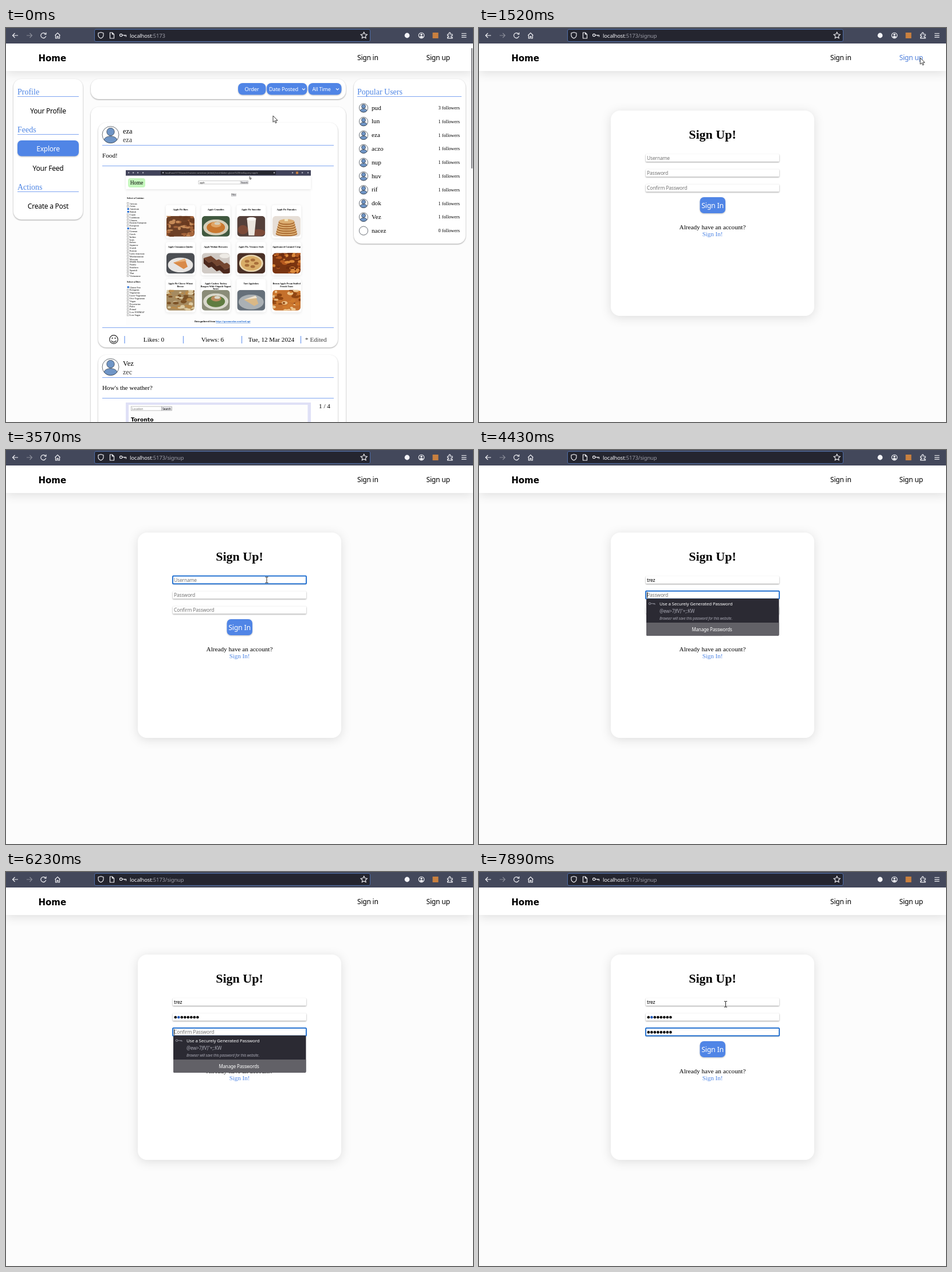
Recreate the animation shown at these times as an HTML page. Size 815 px wide and 687 px high, loop 8000 ms.

```html
<!DOCTYPE html>
<html lang="en">
<head>
<meta charset="utf-8">
<title>Sign up flow</title>
<style>
html, body { margin: 0; width: 100%; height: 100%; overflow: hidden; }
svg { display: block; width: 100vw; height: 100vh; }
svg svg { width: 49px; height: 36px; }
text { font-family: "Liberation Serif", serif; white-space: pre; }
.sans { font-family: "Noto Sans", "Open Sans", sans-serif; letter-spacing: -.02em; }
.wide { font-family: "DejaVu Sans", sans-serif; font-weight: bold; }
.mid { text-anchor: middle; }
.end { text-anchor: end; }
.bold { font-weight: bold; }
.italic { font-style: italic; }
.blue { fill: #4e85e4; }
.white { fill: white; }
.grey { fill: #757575; }
.dark { fill: #3a3a3a; }
.pale { fill: #a9a9b4; }
.panel { fill: white; filter: drop-shadow(0 1px 1.3px rgba(0,0,0,.36)); }
.lift { fill: white; filter: drop-shadow(0 3px 9px rgba(0,0,0,.12)); }
.card { fill: white; filter: drop-shadow(0 1px 2px rgba(0,0,0,.1)); }
.button { fill: #5085e6; filter: drop-shadow(0 1px 1px rgba(0,0,0,.25)); }
.field { fill: white; filter: drop-shadow(0 1px 1px rgba(0,0,0,.4)); }
.icon { fill: none; stroke: #f4f4f8; stroke-width: 1.15; }
.glow { fill: #f6ee3e; mix-blend-mode: multiply; }
</style>
</head>
<body>
<svg id="stage" viewBox="0 0 815 687" preserveAspectRatio="none"></svg>
<script>
const BLUE = '#7fa5f1';
const list = (items, draw) => items.map(draw).join('');
const text = (x, y, size, str, cls = '') =>
  `<text x="${x}" y="${y}" font-size="${size}" class="${cls}">${str}</text>`;
const rect = (x, y, w, h, attrs = '') =>
  `<rect x="${x}" y="${y}" width="${w}" height="${h}" ${attrs}/>`;
const rule = (x1, x2, y) => rect(x1, Math.floor(y), x2 - x1, 1, `fill="${BLUE}"`);
const panel = (x, y, w, h) => rect(x, y, w, h, 'rx="14" class="panel"');
const button = (x, y, w, h, rx = 7) => rect(x, y, w, h, `rx="${rx}" class="button"`);
const path = (d, attrs = 'class="icon"') => `<path d="${d}" ${attrs}/>`;
const circle = (x, y, r, attrs) => `<circle cx="${x}" cy="${y}" r="${r}" ${attrs}/>`;
const ellipse = (x, y, rx, ry, fill) => `<ellipse cx="${x}" cy="${y}" rx="${rx}" ry="${ry}" fill="${fill}"/>`;

// Small seeded generator for the crumbs inside the food pictures
let seed = 7;
const random = () => (seed = seed * 16807 % 2147483647) / 2147483647;

function avatar(x, y, r, blank) {
  const s = r / 14.5, line = `stroke="#29313c" stroke-width="${.7 / s}"`;
  const person = blank ? '' : circle(0, -5, 6.7, `fill="#6f95c6" ${line}`) +
    path('M-11.5 9C-9 .5 9 .5 11.5 9A14.5 14.5 0 0 1-11.5 9Z', `fill="#6f95c6" ${line}`);
  return `<g transform="translate(${x} ${y}) scale(${s})">` +
    circle(0, 0, 14.5, `fill="white" ${line}`) + person + '</g>';
}

function browserBar() {
  return rect(0, 0, 815, 27, 'fill="#43485b"') +
    rect(154.5, 2.5, 481, 21, 'rx="2.5" fill="#24252f" stroke="#4f6ea8"') +
    path('M21 13h-9.5m4-4l-4 4 4 4') +
    path('M36 13h9.5m-4-4l4 4-4 4', 'class="icon" opacity=".4"') +
    path('M69 10.5a4.5 4.5 0 1 0 .7 3.5M70 7.8v3.2h-3.2') +
    path('M85.5 13l4.5-4.5 4.5 4.5M86.5 12v6h2.5v-3.5h2v3.5h2.5v-6') +
    path('M165.5 7.5l4.5 1.5v3.5c0 3-2 4.5-4.5 5.5-2.5-1-4.5-2.5-4.5-5.5V9z') +
    path('M181.5 8h4l3 3v7h-7zm4 0v3h3') +
    circle(200.7, 12.5, 2.2, 'class="icon"') + path('M203 12.5h6.5v3m-2.5-3v2') +
    path('M624.7 7.3l1.7 3.5 3.8.5-2.8 2.7.7 3.8-3.4-1.8-3.4 1.8.7-3.8-2.8-2.7 3.8-.5z') +
    circle(700, 13, 4.4, 'fill="#f4f4f8"') +
    circle(725, 13, 4.8, 'class="icon"') + circle(725, 11.6, 1.8, 'fill="#f4f4f8"') +
    path('M721.5 15.8c1-2.5 6-2.5 7 0l-3.5 1.5z', 'fill="#f4f4f8"') +
    rect(744.5, 8, 10, 10, 'fill="#c9803f"') +
    path('M770.5 11h2.5V9.3a1.4 1.4 0 0 1 2.8 0V11h3.2v2.5h-1.2a1.3 1.3 0 0 0 0 2.6h1.2v1.8h-8.5v-2h1.2a1.2 1.2 0 0 0 0-2.4h-1.2z') +
    path('M795 9.5h8.5m-8.5 3.3h8.5m-8.5 3.3h8.5') +
    `<text x="216" y="16.5" font-size="9.5" class="sans" fill="#f4f4f8">localhost<tspan fill="#9a9ba6">:5173<tspan id="route"></tspan></tspan></text>`;
}

function header() {
  return rect(0, 27, 815, 48, 'class="lift"') + text(56.5, 57.5, 15, 'Home', 'wide') +
    text(613, 56, 12.1, 'Sign in', 'sans') +
    '<text id="signup-link" x="733.5" y="56" font-size="12.2" class="sans">Sign up</text>';
}

function sidebar() {
  const title = (y, str) => text(20, y, 14, str, 'blue') + rule(20, 127, y + 3.5);
  const item = (y, str, cls = '') => text(73.5, y, 12, str, 'sans mid ' + cls);
  return panel(13, 89, 121, 245) +
    title(116, 'Profile') + item(149, 'Your Profile') +
    title(181.5, 'Feeds') + button(20, 196, 107, 27.5) + item(214.5, 'Explore', 'white') +
    item(249, 'Your Feed') + title(281.5, 'Actions') + item(314.5, 'Create a Post');
}

function popularUsers() {
  const names = ['pud', 'lun', 'eza', 'aczo', 'nup', 'huv', 'rif', 'dok', 'Vez', 'nacez'];
  return panel(607, 89, 195, 287) + text(613, 116, 14, 'Popular Users', 'blue') + rule(613, 795, 119.5) +
    list(names, (name, i) => {
      const y = 139 + i * 23.8;
      return avatar(624, y + .3, 7.6, i === 9) + text(638, y + 3.5, 11.2, name) +
        text(792, y + 3, 8.3, `${[3, 1, 1, 1, 1, 1, 1, 1, 1, 0][i]} followers`, 'end');
    });
}

function sortBar() {
  const chevron = x => path(`M${x} 105.5l2.5 2.5 2.5-2.5`);
  return panel(148, 89, 445, 35) + button(405, 96, 48.5, 20.5, 8) + button(455, 96, 70.5, 20.5, 8) +
    button(527.5, 96, 58, 20.5, 8) + text(429, 110, 9.4, 'Order', 'sans mid white') +
    text(459, 110, 9.3, 'Date Posted', 'sans white') + text(534.5, 110, 9, 'All Time', 'sans white') +
    chevron(517) + chevron(576);
}

// Simple dishes; each takes the main, accent and light tone
const DISHES = {
  heap: (main, accent, light) => list([...Array(45)], (_, i) =>
    ellipse(random() * 49, random() * 36, 2 + random() * 3.5, 1.2 + random() * 2, [main, accent, light][i % 3])),
  plate: (main, accent, light) => ellipse(24.5, 20, 22, 14, light) + ellipse(24.5, 20, 16, 10, main) +
    ellipse(25, 15, 9, 5, accent) + ellipse(27, 13, 5, 2.5, light),
  slice: (main, accent, light) => ellipse(24.5, 21, 22, 13, light) +
    path('M12 17L32 10 37 24 30 28z', `fill="${main}"`) + path('M12 17L32 10 35 14z', `fill="${accent}"`),
  pie: (main, accent, light) => ellipse(24.5, 18, 21, 15, light) + ellipse(24.5, 18, 18, 12.5, main) +
    list([0, 1, 2, 3, 4], i => ellipse(24.5 + 9 * Math.cos(i * 1.26), 18 + 6 * Math.sin(i * 1.26), 4, 2.5, accent)),
  glass: (main, accent, light) => ellipse(10, 24, 9, 8, accent) + ellipse(37, 29, 12, 6, accent) +
    path('M17 4H33L30 34H20z', `fill="${main}"`) + ellipse(25, 5, 8, 3, light),
  stack: (main, accent, light) => list([0, 1, 2, 3, 4, 5], i =>
    ellipse(24.5, 31 - i * 4, 19 - i, 4.5, accent) + ellipse(24.5, 29.5 - i * 4, 18.5 - i, 4, main)) + rect(21, 5, 6, 4, `fill="${light}"`),
  bars: (main, accent, light) => list([0, 1, 2], i =>
    path(`M${3 + i * 14} ${9 + i * 6}l13-4 9 7-13 5z`, `fill="${accent}"`) +
    path(`M${3 + i * 14} ${9 + i * 6}l9 8v9l-9-8zm9 8l13-5v9l-13 5z`, `fill="${main}"`)) + ellipse(40, 5, 9, 4, light)
};

const photo = (x, y, dish, [back, ...tones]) =>
  `<svg x="${x}" y="${y}" width="49" height="36">${rect(0, 0, 49, 36, `rx="6" fill="${back}"`)}` +
  `<g style="clip-path:inset(0 round 6px)">${DISHES[dish](...tones)}</g></svg>`;

function recipePicture() {
  const cuisines = 'African,Asian,American,British,Cajun,Caribbean,Chinese,Eastern European,European,French,German,Greek,Indian,Irish,Italian,Japanese,Jewish,Korean,Latin American,Mediterranean,Mexican,Middle Eastern,Nordic,Southern,Spanish,Thai,Vietnamese'.split(',');
  const diets = 'Gluten Free,Ketogenic,Vegetarian,Lacto-Vegetarian,Ovo-Vegetarian,Vegan,Pescetarian,Paleo,Primal,Low FODMAP,Low Sugar'.split(',');
  const checks = (names, top, on) => list(names, (name, i) => {
    const y = top + i * 4.85;
    return rect(211.7, y - 1.6, 3, 3, on.includes(i) ? 'fill="#1764d0"' : 'fill="white" stroke="#777" stroke-width=".5"') +
      text(216, y + 1.5, 4.1, name);
  });
  const recipes = [
    ['Apple Pie Bars', 'heap', '#6d4026 #a5643a #6a3a20 #c58a58'],
    ['Apple Crumbles', 'plate', '#40583f #c9782f #e0a566 #d5cdb8'],
    ['Apple Pie Smoothie', 'glass', '#54403a #ece6de #7c4a38 #faf8f4'],
    ['Apple Pie Pancakes', 'stack', '#e6ded6 #dcae72 #a8682f #f4e4b8'],
    ['Apple Cinnamon Quiche', 'slice', '#4c4f54 #d98a48 #e8b27c #e6e4e2'],
    ['Apple Walnut Brownies', 'bars', '#d0cac5 #4c281c #744630 #eeebe6'],
    ['Apple Pie, Viennese Style', 'pie', '#4a3026 #d9ad68 #a86e3a #ead9b4'],
    ['Applesauced Caramel Crisp', 'heap', '#7a3410 #b5591f #6e2c0e #dc8a3c'],
    ['Apple Pie Cheese Wheat|Breeze', 'heap', '#a58a60 #b98a4a #7c5226 #dccba4'],
    ['Apple Cashew Turkey|Burgers With Chipotle Yogurt|Sauce', 'plate', '#8a8c78 #5f7c40 #b98a5e #d9d8cc'],
    ['Tart Appleslaw', 'slice', '#66707a #d9b886 #f0e4d0 #aab0b4'],
    ['Brown Apple Pecan Stuffed|French Toast', 'heap', '#c4702c #d07a2c #8f4512 #ecc48c']
  ];
  const cards = list(recipes, ([name, dish, colours], i) => {
    const x = 280 + i % 4 * 61.7, y = 327.8 + Math.floor(i / 4) * 64.5;
    return rect(x - 1, y - 19, 51, 58, 'rx="4" class="card"') + photo(x, y, dish, colours.split(' ')) +
      list(name.split('|'), (line, k) => text(x + 24.5, y - 9.5 + k * 4.4, 4.1, line, 'mid bold'));
  });
  return rect(209, 248, 323, 270, 'fill="#fdfdfd"') + rect(209, 257, 323, 24, 'class="card"') +
    rect(209, 248, 323, 9.5, 'fill="#41435a"') + rect(270, 249, 201, 7, 'rx="1" fill="#25262f"') +
    text(278, 254, 4, 'localhost:5173/search?cuisine=american,british,french&amp;diet=gluten%20free&amp;query=apple', 'sans pale') +
    list([213, 221, 229, 238, 273, 467, 499, 516, 526], x => rect(x, 251.2, 2.2, 2.2, 'fill="#a9aab6"')) +
    rect(506, 250.5, 4, 4, 'fill="#c9803f"') +
    rect(213, 262, 30, 16, 'rx="4" fill="#c6f8be"') + text(228, 273, 9.3, 'Home', 'mid') +
    rect(336, 266.5, 73, 5.5, 'fill="white" stroke="#999" stroke-width=".5"') + text(338, 270.8, 4, 'apple') +
    '<rect id="search" x="410" y="266.5" width="12.5" height="5.5" stroke="#999" stroke-width=".5"/>' +
    text(416.2, 270.8, 3.7, 'Search', 'sans mid') +
    rect(393.5, 288.8, 8, 4.7, 'fill="#e4e4e8" stroke="#999" stroke-width=".4"') + text(397.5, 292.4, 3.4, 'Filter', 'mid') +
    text(211, 297.5, 4.3, 'Select a Cuisine:', 'bold') + checks(cuisines, 306, [2, 3, 9]) +
    text(211, 443.5, 4.3, 'Select a Diet:', 'bold') + checks(diets, 452, [0]) + cards +
    text(329, 513, 4.3, 'Data gathered from <tspan fill="#1764d0" text-decoration="underline">https://spoonacular.com/food-api</tspan>', 'bold') +
    '<g id="tiny-pointer">' + path(ARROW, 'fill="white" stroke="black" stroke-width="1.4" transform="scale(.4)"') + '</g>';
}

const ARROW = 'M0 0v11.2l2.6-2.4 1.8 4 1.8-.8-1.8-3.8h3.6z';

function post(y, user, handle, message, height) {
  return panel(161, y, 418, height) + avatar(182.5, y + 21, 14.5) +
    text(204, y + 18.5, 12.5, user) + text(204, y + 33.5, 12, handle, 'dark') + rule(168, 572, y + 39) +
    text(168, y + 61, 11.2, message) + rule(168, 572, y + 75);
}

function feed() {
  const divider = x => rect(x - .7, 537, 1.4, 13, `fill="${BLUE}"`);
  return panel(148, 137.5, 445, 600) + post(165, 'eza', 'eza', 'Food!', 392) + recipePicture() +
    rule(168, 572, 522) + circle(188, 543, 7.3, 'fill="none" stroke="#222" stroke-width="1.2"') +
    circle(185.5, 540.8, 1, '') + circle(190.5, 540.8, 1, '') +
    path('M183.8 545a4.7 4.7 0 0 0 8.4 0', 'fill="none" stroke="#222" stroke-width="1.2"') +
    list([207, 309.5, 411.5, 514.5], divider) +
    text(258, 547, 11.2, 'Likes: 0', 'mid') + text(360.5, 547, 11.2, 'Views: 6', 'mid') +
    text(463, 547, 11.2, 'Tue, 12 Mar 2024', 'mid') + text(522, 547, 11.2, '* Edited', 'dark') +
    post(570, 'Vez', 'zec', "How's the weather?", 160) +
    rect(209, 653, 323, 40, 'fill="#dfe0f6"') + rect(214, 657, 312.5, 40, 'fill="#fdfdfd"') +
    rect(218.5, 660, 53, 7, 'fill="white" stroke="#999" stroke-width=".6"') + text(220, 665.5, 5, 'Location', 'sans grey') +
    rect(271.5, 660, 18, 7, 'fill="#e4e4e8" stroke="#999" stroke-width=".6"') + text(280.5, 665.5, 4.7, 'Search', 'sans mid') +
    text(218, 686, 9.2, 'Toronto', 'wide') + text(546, 663, 11.2, '1 / 4') +
    rect(812, 35, 2, 210, 'rx=".8" fill="#7d7d82"');
}

function signupPage() {
  return rect(230, 144, 355, 358, 'rx="16" class="lift"') + text(407.5, 193, 22, 'Sign Up!', 'bold mid') +
    button(385.5, 295, 44.5, 28) + text(407.5, 314, 12.4, 'Sign In', 'sans mid white') +
    text(407.5, 350.5, 11.2, 'Already have an account?', 'mid') + text(407.5, 363, 11, 'Sign In!', 'mid blue');
}

function popup(y) {
  return `<g transform="translate(292 ${y})">` + rect(0, 0, 231.5, 65, 'rx="2.5" fill="#2b2a33"') +
    path('M0 42h231.5v20.5a2.5 2.5 0 0 1-2.5 2.5H2.5A2.5 2.5 0 0 1 0 62.5z', 'fill="#626167"') +
    circle(6, 8.8, 1.8, 'fill="none" stroke="#8f8f9a"') + path('M8 8.8h7v2m-2-2v1.5', 'fill="none" stroke="#8f8f9a"') +
    text(23, 12.2, 7.9, 'Use a Securely Generated Password', 'sans white') +
    text(23, 25, 8, '@ew&gt;7JfV)"+;:KW', 'sans pale') +
    text(23, 37, 6.3, 'Browser will save this password for this website.', 'sans italic pale') +
    text(114.5, 57, 8, 'Manage Passwords', 'sans mid white') + '</g>';
}

const USERNAME = 'trez', PLACEHOLDERS = ['Username', 'Password', 'Confirm Password'];
const KEYS = [
  [3700, 3840, 3970, 4100],
  [5030, 5100, 5230, 5360, 5560, 5630, 5760, 5960],
  [6430, 6560, 6690, 6890, 7030, 7160, 7290, 7490]
];
const FOCUS = [3040, 4300, 6160];
const within = (t, spans) => spans.some(([a, b]) => t >= a && t < b);

function fields(t) {
  const focused = FOCUS.filter(start => t >= start).length - 1;
  const caretOn = !within(t, [[3570, 3700], [4830, 5030], [7750, 8000]]);
  return list(PLACEHOLDERS, (hint, i) => {
    const y = 220 + i * 26.2, typed = KEYS[i].filter(k => t >= k).length;
    let out = rect(291, y, 233, 13, 'rx="1.5" class="field"');
    if (i === focused) out += rect(291, y - .3, 233, 13.6, 'rx="1" fill="white" stroke="#0b62cc" stroke-width="1.7"');
    if (!typed) out += text(293, y + 9.8, 8.5, hint, 'sans grey');
    else if (i === 0) out += text(293, y + 9.8, 8.5, USERNAME.slice(0, typed), 'sans');
    else out += list(KEYS[i].slice(0, typed), (_, k) =>
      circle(295.8 + k * 5.5, y + 7, 2.3, `fill="${i === 1 && k === 1 ? '#1a56b8' : 'black'}"`));
    if (i === focused && caretOn) out += rect(293 + typed * (i ? 5.5 : 3.7), y + 1.5, .9, 10.5);
    return out;
  }) + (within(t, [[4430, 5030]]) ? popup(259) : '') + (within(t, [[6230, 6430]]) ? popup(285) : '');
}

// Each leg: start time, number of screen refreshes, end point
const LEGS = [[320, 12, 770, 52], [1780, 9, 464, 235], [2580, 2, 467, 232], [3040, 6, 455, 226.5], [7890, 1, 430.5, 230.5]];

function pointerAt(t) {
  let x = 466, y = 153;
  for (const [start, steps, endX, endY] of LEGS) {
    if (t < start) break;
    const p = Math.min(steps, Math.floor((t - start + 2) / 66.5) + 1) / steps;
    const eased = p * p * (3 - 2 * p);
    x += (endX - x) * eased;
    y += (endY - y) * eased;
  }
  return { x, y };
}

function pointer(t, { x, y }) {
  if (within(t, [[3700, 7890]])) return '';
  const glow = within(t, [[1380, 1520], [3040, 3240]]) ? circle(x - .5, y + .5, 8.5, 'class="glow"') : '';
  const shape = t >= 2580
    ? path('M-2.5-5h2l.5.5.5-.5h2M0-4.5v9M-2.5 5h2l.5-.5.5.5h2', 'fill="none" stroke="#222"')
    : path(ARROW, 'fill="white" stroke="#222" stroke-width=".9"');
  return `${glow}<g transform="translate(${x} ${y})">${shape}</g>`;
}

const stage = document.getElementById('stage');
stage.innerHTML = rect(0, 0, 815, 687, 'fill="#fcfcfc"') + header() + browserBar() +
  `<g id="home-page">${sidebar()}${sortBar()}${feed()}${popularUsers()}</g>` +
  `<g id="signup-page">${signupPage()}</g><g id="live"></g>`;
const el = id => document.getElementById(id);
const show = (id, on) => el(id).setAttribute('display', on ? 'inline' : 'none');

function render(t) {
  const signup = t >= 1520, clicked = t >= 1380, at = pointerAt(t);
  show('home-page', !signup);
  show('signup-page', signup);
  el('route').textContent = signup ? '/signup' : '';
  el('signup-link').setAttribute('fill', at.x > 732 && at.y < 62 ? '#4e7fdc' : 'black');
  el('search').setAttribute('fill', clicked ? '#c3c3c9' : '#e4e4e8');
  el('tiny-pointer').setAttribute('transform', clicked ? 'translate(414 271)' : 'translate(425 259)');
  el('live').innerHTML = (signup ? fields(t) : '') + pointer(t, at);
}

const startTime = performance.now();
function tick() {
  render((performance.now() - startTime) % 8000);
  requestAnimationFrame(tick);
}
tick();
</script>
</body>
</html>
```
